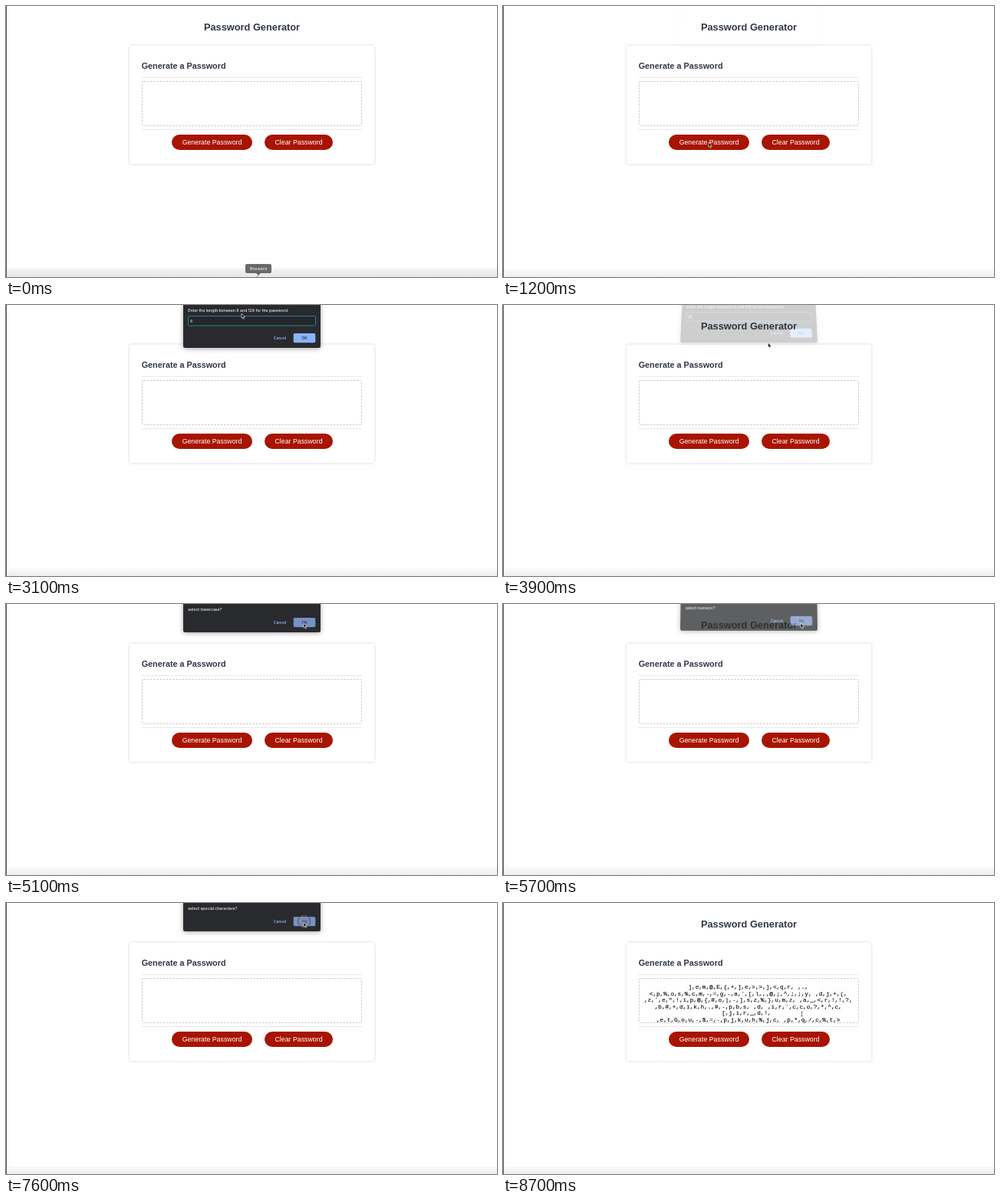
An HTML page that plays this animation: 640x354 px, repeating every 9.4 s.

```html
<!DOCTYPE html>
<html lang="en">
<head>
<meta charset="utf-8">
<title>Password Generator</title>
<style>
  html, body { margin: 0; width: 100%; height: 100%; overflow: hidden; background: #fff; }
  svg { position: absolute; left: 0; top: 0; overflow: visible; }
  text { white-space: pre; }
  .middle { text-anchor: middle; }
  #page { font-family: "Liberation Sans", Arial, sans-serif; }
  #page .heading { font-weight: bold; fill: #303844; }
  #page .button { fill: #a81400; }
  #page .label { font-size: 8.8px; fill: #fff; text-anchor: middle; }
  #card { filter: drop-shadow(0 .6px 1.6px rgba(0, 0, 0, .2)); }
  #password { font: 7.68px "Liberation Mono", "Courier New", monospace; fill: #111; stroke: #111; stroke-width: .15; text-anchor: middle; }
  #tooltip text, #dialog { font-family: Inter, Roboto, sans-serif; }
  #dialog { left: 231px; font-size: 5.15px; fill: #eceef0; filter: drop-shadow(0 1px 3px rgba(0, 0, 0, .35)); }
  #message { font-weight: 500; }
  #dialog .action { font-size: 4.9px; font-weight: 600; text-anchor: middle; }
</style>
</head>
<body>
<svg id="page" width="640" height="354">
  <defs>
    <linearGradient id="shade" x2="0" y2="1">
      <stop stop-color="#fafafa"/><stop offset="1" stop-color="#eeeeee"/>
    </linearGradient>
  </defs>
  <rect y="344" width="640" height="10" fill="url(#shade)"/>
  <rect width="1" height="354" fill="#55575c"/>
  <text class="heading middle" x="320.5" y="31.5" font-size="12.8">Password Generator</text>
  <rect id="card" x="161" y="51.5" width="319" height="155" rx="2" fill="#fff"/>
  <text class="heading" x="176.7" y="81.5" font-size="10.8">Generate a Password</text>
  <path d="M177 93.5H464M177 161.5H464" stroke="#e8e8e8"/>
  <rect x="177.5" y="98.5" width="286" height="58" rx="2" fill="none" stroke="#cbcbcb" stroke-dasharray="2.6 1.6"/>
  <g id="password"></g>
  <rect class="button" x="216" y="168" width="105" height="20" rx="10"/>
  <rect class="button" x="337" y="168" width="89" height="20" rx="10"/>
  <text class="label" x="268.5" y="181">Generate Password</text>
  <text class="label" x="381.5" y="181">Clear Password</text>
  <g id="tooltip">
    <rect y="342" width="640" height="12" fill="#000" opacity=".03"/>
    <rect x="312" y="337" width="34" height="12" rx="2" fill="#68696b"/>
    <path d="M326 349h6l-3 3z" fill="#68696b"/>
    <text class="middle" x="329" y="344.8" font-size="5.3" fill="#fff">Boxward</text>
  </g>
</svg>

<svg id="dialog" width="179" height="56" viewBox="231 0 179 56">
  <rect id="panel" x="231" y="-4" width="179" height="60" rx="2.5" fill="#292a2d"/>
  <text id="message" x="237.3" y="9.2"></text>
  <g id="field">
    <rect x="237.5" y="14.5" width="166" height="12.5" rx="1.5" fill="#242629" stroke="#33789b"/>
    <text id="typed" x="240" y="22.6"></text>
    <rect id="caret" y="17.5" width=".7" height="6"/>
  </g>
  <g id="actions">
    <text class="action" x="357" y="44.8" fill="#8ab4f8">Cancel</text>
    <rect id="ok" x="374.7" y="37" width="28.6" height="12.3" rx="1.8"/>
    <text class="action" x="389" y="44.8" fill="#24365c">OK</text>
  </g>
</svg>

<svg id="pointer" width="640" height="354">
  <g id="cursor">
    <circle id="ring" cx=".5" cy="-1" r="8" fill="#888" fill-opacity=".3" stroke="#4b5263"/>
    <path id="arrow" d="M0 0V6.2L1.4 5 2.4 7.3 3.5 6.8 2.5 4.6H4.4Z" fill="#111" stroke="#fff" stroke-width=".6"/>
    <path id="beam" d="M-1.2-3Q0-3 0-2.2 0-3 1.2-3M0-2.5V2.5M-1.2 3Q0 3 0 2.2 0 3 1.2 3" fill="none" stroke="#444" stroke-width=".7"/>
  </g>
</svg>

<script>
const LOOP = 9400, FADE = 200;
const $ = id => document.getElementById(id);
const clamp = v => Math.min(1, Math.max(0, v));
const show = (id, on) => { $(id).style.display = on ? '' : 'none'; };

const passwordLines = [
  '],e,m,@,E,{,+,],e,>,>,],<,q,r, ,.,',
  '<,p,%,o,s,%,c,m,-,=,g,-,a,`,[,l,,,@,;,^,;,;,y, ,d,j,+,(,',
  ',z,`,e,",!,i,p,@,{,#,o,|,-,],s,z,%,},u,m,z, ,a,_,<,r,!,!,?,',
  ',b,#,+,d,i,k,h,.,#,-,p,b,s, ,d, ,i,r,`,c,c,o,?,*,^,c,',
  '[,j,i,r,_,d,!, ',
  ',e,t,G,o,u,-,$,=,-,p,j,k,u,h,%,j,c, ,p,*,q,/,c,%,t,>'
];
passwordLines.forEach((line, i) => {
  const row = document.createElementNS('http://www.w3.org/2000/svg', 'text');
  row.setAttribute('x', 319.7);
  row.setAttribute('y', 112 + i * 8.6);
  row.textContent = line;
  $('password').append(row);
});

const dialogs = [
  { open: 1200, close: 3748, height: 56, message: 'Enter the length between 8 and 128 for the password.' },
  { open: 4050, close: 5250, height: 37, message: 'select lowercase?' },
  { open: 5550, close: 6450, height: 37, message: 'select numeric?' },
  { open: 6750, close: 7670, height: 37, message: 'select special characters?' }
];
const clicks = [1000, 5130, 6330, 7520];
const typingTime = 2600;

// time, x, y
const path = [
  [150, 327, 352], [900, 268, 178], [1250, 268, 178], [1750, 307, 11],
  [3450, 307, 11], [3900, 345.6, 49.3], [4500, 388, 25], [8050, 388, 25], [8480, 389.5, 145]
];

function cursorAt(t) {
  const next = path.findIndex(p => p[0] > t);
  if (next === 0) return path[0].slice(1);
  if (next < 0) return path[path.length - 1].slice(1);
  const [t0, x0, y0] = path[next - 1], [t1, x1, y1] = path[next];
  const u = (t - t0) / (t1 - t0), k = u * u * (3 - 2 * u);
  return [x0 + (x1 - x0) * k, y0 + (y1 - y0) * k];
}

function drawDialog(t, x, y) {
  const d = dialogs.find(d => t >= d.open && t < d.close + FADE);
  show('dialog', d);
  if (!d) return;
  const isPrompt = d.height === 56, shift = d.height - 56;
  const hidden = Math.max(1 - clamp((t - d.open) / FADE), clamp((t - d.close) / FADE));
  const style = $('dialog').style;
  style.opacity = 1 - hidden;
  style.transformOrigin = `50% ${d.height}px`;
  style.transform = hidden
    ? `perspective(300px) translateY(${-8.8 * hidden}px) rotateX(${12.5 * hidden}deg)` : 'none';
  $('panel').setAttribute('height', d.height + 4);
  $('message').textContent = d.message;
  $('actions').setAttribute('transform', `translate(0 ${shift})`);
  const hover = x > 375 && x < 403 && y > 37 + shift && y < 49 + shift;
  $('ok').setAttribute('fill', hover ? '#7890c4' : '#8ab4f8');

  show('field', isPrompt);
  const typed = t >= typingTime ? '8' : '';
  $('typed').textContent = typed;
  $('caret').setAttribute('x', 240.3 + typed.length * 3.4);
  show('caret', (t - 1400) % 1000 < 600);
}

function draw(now) {
  const t = now % LOOP, [x, y] = cursorAt(t);
  $('tooltip').style.opacity = 1 - clamp((t - 100) / 200);
  show('password', t >= 7800);
  drawDialog(t, x, y);
  const inBox = t > 8050 && y > 98;
  $('cursor').setAttribute('transform', `translate(${x} ${y})`);
  show('arrow', !inBox);
  show('beam', inBox);
  show('ring', clicks.some(c => t >= c && t < c + 160));
  requestAnimationFrame(draw);
}
draw(performance.now());
</script>
</body>
</html>
```
